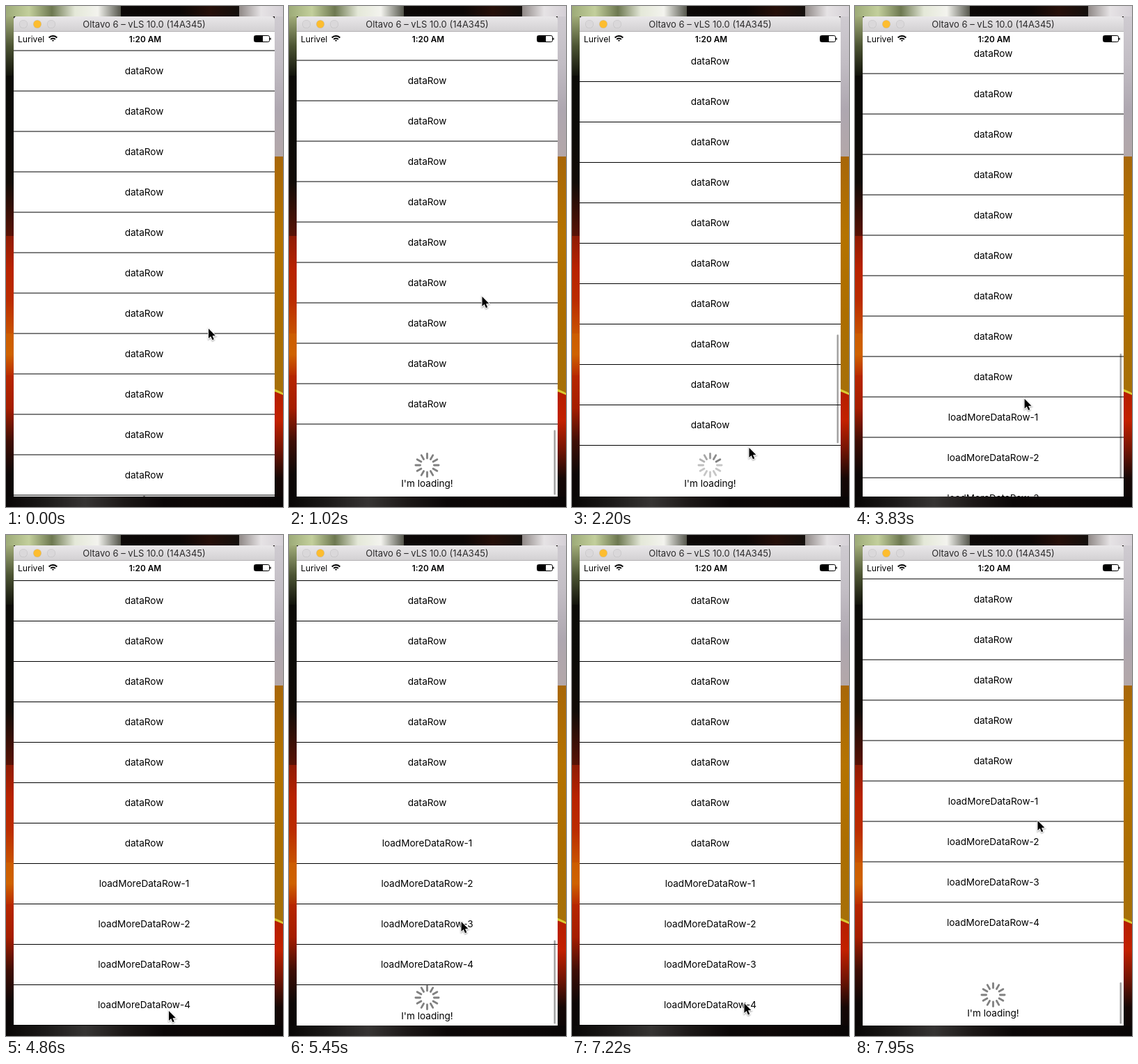
Write an HTML page with a canvas that moves like this. It is 398 by 719 pixels and loops after 8 s.

```html
<!DOCTYPE html>
<html lang="en">
<head>
<meta charset="utf-8">
<title>Load more list</title>
<style>
html, body { margin: 0; width: 100%; height: 100%; overflow: hidden; background: #0b0705; }
canvas { display: block; }
</style>
</head>
<body>
<canvas id="stage" width="398" height="719"></canvas>
<script>
const ctx = document.getElementById('stage').getContext('2d');
const LOOP = 8000, STEP = 147.25;
const ROW = 58, LEFT = 11, WIDTH = 375, TOP = 57, BOTTOM = 704, MIDDLE = 198.5;
const VIEW = 667, DOCK = 630, REST = 703;
const LOADED = 3680, FLING = 4060;

// One pull past the end of the list: when it is grabbed and let go, and where the list settles.
const firstPull = { grab: 400, release: 1250, rest: DOCK };
const secondPull = { grab: 5150, release: 6230, rest: REST };
const thirdPull = { grab: 7230, release: LOOP, rest: REST };

const pointerStart = { x: 290.5, y: 463 };
const pointerMoves = [
  { from: 0, to: 400, x: 282, y: 640 },
  { from: 400, to: 950, x: 277, y: 417 },
  { from: 1250, to: 2000, x: 254, y: 634 },
  { from: 3600, to: FLING, x: 232, y: 492 },
  { from: FLING, to: 4600, x: 233, y: 694 },
  { from: 4600, to: 5150, x: 234, y: 670 },
  { from: 5150, to: 5760, x: 261, y: 432 },
  { from: 6230, to: 6800, x: 247, y: 703 },
  { from: 6800, to: 7230, x: 247, y: 672 },
  { from: 7230, to: 7800, x: 262, y: 410 }
];

const clamp = v => Math.min(1, Math.max(0, v));
const smooth = p => p * p * (3 - 2 * p);
const mix = (a, b, p) => a + (b - a) * p;

function pointerAt(t) {
  return pointerMoves.reduce((at, move) => {
    const p = smooth(clamp((t - move.from) / (move.to - move.from)));
    return { x: mix(at.x, move.x, p), y: mix(at.y, move.y, p) };
  }, pointerStart);
}

// Rubber band: the further the drag, the less the list follows.
const rubberBand = drag => VIEW * (1 - 1 / (Math.max(0, drag) * 0.55 / VIEW + 1));
const settle = (from, to, since, t) => mix(from, to, smooth(clamp((t - since) / 350)));

function pulledEnd({ grab, release, rest }, t) {
  const drag = pointerAt(grab).y - pointerAt(Math.min(t, release)).y;
  return settle(REST - rubberBand(drag), rest, release, t);
}

// Position of the line below the last row.
function listEnd(t) {
  if (t < firstPull.grab) return settle(REST - 1.5, REST, 0, t);
  if (t < LOADED) return pulledEnd(firstPull, t);
  if (t < secondPull.grab) {
    return settle(pointerAt(Math.min(t, FLING)).y + 229, REST, FLING, t);
  }
  return pulledEnd(t < thirdPull.grab ? secondPull : thirdPull, t);
}

function scrollBarAlpha(t) {
  const shown = (from, to) => clamp(Math.min((t - from) / 140, (to + 300 - t) / 300));
  return Math.max(shown(firstPull.grab, 2250), shown(LOADED, 4450),
    shown(secondPull.grab, 6650), shown(thirdPull.grab, LOOP));
}

function rect(x, y, w, h, color) {
  ctx.fillStyle = color;
  ctx.fillRect(x, y, w, h);
}

function pill(x, y, w, h, color, radius = Math.min(w, h) / 2) {
  ctx.fillStyle = color;
  ctx.beginPath();
  ctx.roundRect(x, y, w, h, radius);
  ctx.fill();
}

function label(text, x, y, size, { weight = 400, align = 'center', color = '#000' } = {}) {
  ctx.font = `${weight} ${size}px Inter, Roboto, sans-serif`;
  ctx.textAlign = align;
  ctx.fillStyle = color;
  ctx.fillText(text, x, y);
}

function clipTo(y, bottom, draw) {
  ctx.save();
  ctx.beginPath();
  ctx.rect(LEFT, y, WIDTH, bottom - y);
  ctx.clip();
  draw();
  ctx.restore();
}

// Evenly spaced colours along the longer side.
function strip(x, y, w, h, colors) {
  const g = w > h ? ctx.createLinearGradient(x, 0, x + w, 0) : ctx.createLinearGradient(0, y, 0, y + h);
  colors.split(' ').forEach((color, i, all) => g.addColorStop(i / (all.length - 1), color));
  rect(x, y, w, h, g);
}

function drawWallpaper() {
  strip(0, 0, 165, 15, '#9dab78 #c3cf9c #6d7850 #e4e8d8 #f3f3ee #55564c');
  strip(165, 0, 170, 15, '#0d0908 #0b0706 #0c0706 #260f09 #14100d');
  strip(335, 0, 63, 15, '#8f8886 #e6e3e5 #d5d0d6');
  strip(0, 15, 11, 85, '#a0ab78 #4c5433 #12130b');
  strip(0, 100, 11, 230, '#0c0b07 #0b0a07 #120b06 #5a1305');
  strip(0, 330, 11, 140, '#8f1c04 #b82200 #bb2c00 #c85200');
  strip(0, 470, 11, 60, '#cc5c00 #cf6200 #b92c00');
  strip(0, 530, 11, 189, '#b72600 #a51d00 #3f0e05 #0d0706 #080606');
  strip(386, 15, 12, 201, '#cfcbd1 #c2bdc4 #aea7b0 #b3a7a9');
  strip(386, 216, 12, 338, '#a86708 #b57300 #ad6e00 #a77008');
  strip(386, 554, 12, 165, '#b61f00 #c22100 #741504 #160806 #090606');
  ctx.strokeStyle = '#d9cc32';
  ctx.lineWidth = 3;
  ctx.beginPath();
  ctx.moveTo(385, 551);
  ctx.lineTo(399, 557);
  ctx.stroke();
  strip(0, 704, 398, 15, '#090706 #1c1a19 #363433 #1c1817 #0b0707 #0e0807 #0b0707 #090606');
}

function drawTitleBar() {
  pill(LEFT, 15, WIDTH, 22, '#b4b2b4', [5, 5, 0, 0]);
  const g = ctx.createLinearGradient(0, 15, 0, 37);
  g.addColorStop(0, '#e9e7e9');
  g.addColorStop(1, '#d2d0d2');
  pill(LEFT, 15, WIDTH, 21, g, [5, 5, 0, 0]);
  ['#dad8da', '#fdbd2f', '#dad8da'].forEach((color, i) => {
    pill(19 + i * 20, 20, 12, 12, '#0002');
    pill(19.5 + i * 20, 20.5, 11, 11, color);
  });
  label('Oltavo 6 – vLS 10.0 (14A345)', MIDDLE, 31, 13, { color: '#2b2a2b' });
}

function drawStatusBar() {
  rect(LEFT, 37, WIDTH, 20, '#fff');
  label('Lurivel', 17, 52, 12.1, { align: 'left' });
  label('1:20 AM', 200, 52, 11.8, { weight: 600 });

  ctx.strokeStyle = '#000';
  ctx.lineWidth = 2;
  for (const radius of [1.2, 4.6, 8]) {
    ctx.beginPath();
    ctx.arc(67.5, 51, radius, -Math.PI * 0.76, -Math.PI * 0.24);
    ctx.stroke();
  }

  ctx.lineWidth = 1;
  ctx.beginPath();
  ctx.roundRect(356.5, 42.5, 22, 9, 2);
  ctx.stroke();
  rect(357, 43, 12, 8, '#000');
  pill(379.3, 45.4, 1.4, 3.4, '#000');
}

function drawFooter(end, t) {
  const y = Math.max(659, end + 19) + clamp((BOTTOM - 110 - end) / 9);
  const spinning = t >= firstPull.release && t < LOADED;
  const head = Math.floor((t - 2200) / 1000 * 12) + 2;
  for (let i = 0; i < 12; i++) {
    const age = (((head - i) % 12) + 12) % 12;
    ctx.save();
    ctx.translate(MIDDLE, y);
    ctx.rotate(i * Math.PI / 6);
    ctx.globalAlpha = spinning ? Math.max(0.45, 1 - age * 0.1) : 1;
    pill(-1.4, -18, 2.8, 9.5, '#808080');
    ctx.restore();
  }
  label("I'm loading!", MIDDLE, y + 31, 13.6);
}

function drawList(end, t) {
  const extra = t >= LOADED ? 4 : 0;
  clipTo(TOP, BOTTOM, () => {
    for (let i = 0, y = end; y > TOP - ROW; i++, y -= ROW) {
      rect(LEFT, y, WIDTH, 1, '#000');
      label(i < extra ? `loadMoreDataRow-${extra - i}` : 'dataRow', MIDDLE, y - 24, 13.6);
    }
  });
  if (end < REST) clipTo(end + 1, BOTTOM, () => drawFooter(end, t));
}

function drawScrollBar(end, t) {
  const docked = t >= firstPull.release && t < LOADED;
  const bottom = docked ? DOCK : BOTTOM;
  const height = VIEW - (BOTTOM - bottom);
  const content = t >= LOADED ? 2486 : 2254;
  const below = end - bottom;
  const length = height * height / content + Math.min(0, below);
  const y = bottom - 2.5 - Math.max(0, below) * height / content;
  ctx.globalAlpha = scrollBarAlpha(t);
  pill(380.5, y - length, 2.5, length, 'rgba(0, 0, 0, .36)');
  ctx.globalAlpha = 1;
}

function drawPointer({ x, y }) {
  const arrow = new Path2D('M.5 0V14L3.7 11 6 16.3 8.3 15.3 6 10.2 10.4 10Z');
  ctx.save();
  ctx.translate(x, y);
  ctx.shadowColor = 'rgba(0, 0, 0, .4)';
  ctx.shadowBlur = 2;
  ctx.shadowOffsetY = 1;
  ctx.strokeStyle = '#fff';
  ctx.lineWidth = 2;
  ctx.stroke(arrow);
  ctx.shadowColor = 'transparent';
  ctx.fillStyle = '#000';
  ctx.fill(arrow);
  ctx.restore();
}

function draw(now) {
  // The picture advances in coarse, even steps.
  const t = Math.floor(now % LOOP / STEP + 0.1) * STEP;
  const end = Math.round(listEnd(t) * 2) / 2;
  drawWallpaper();
  rect(LEFT, 37, WIDTH, BOTTOM - 37, '#fff');
  drawList(end, t);
  drawScrollBar(end, t);
  drawTitleBar();
  drawStatusBar();
  drawPointer(pointerAt(t));
}

const start = performance.now();
function tick() {
  draw(performance.now() - start);
  requestAnimationFrame(tick);
}
tick();
</script>
</body>
</html>
```
